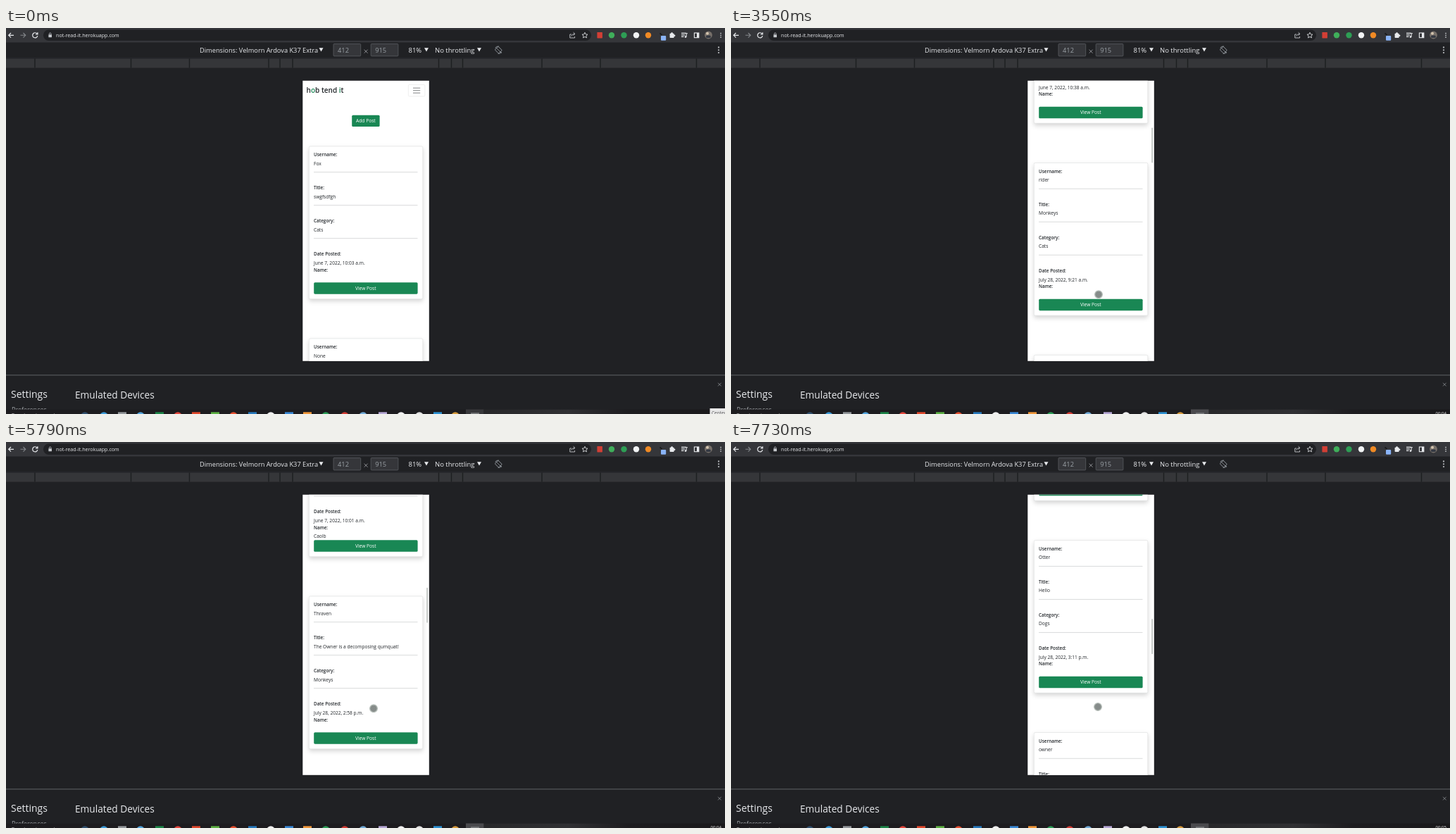
An HTML page for the animation above (8 s loop, 1021 by 548 pixels).

```html
<!DOCTYPE html>
<html lang="en">
<head>
<meta charset="utf-8">
<title>Mobile feed preview</title>
<style>
  html, body { margin: 0; width: 100%; height: 100%; overflow: hidden; background: #202124; }
  svg { display: block; width: 1021px; height: 548px; font-family: "Open Sans", "Noto Sans", sans-serif; }
  text { white-space: pre; }
  .card { fill: #fff; stroke: #dcdddd; stroke-width: .6; filter: drop-shadow(0 3.2px 3.2px rgba(0, 0, 0, .17)); }
</style>
</head>
<body>
<svg id="stage" viewBox="0 0 1021 548"></svg>
<script>
const LOOP = 8000;
const NOTCH = 43.53;      // pixels per wheel notch
const CARD_STEP = 272.9;
const GREEN = '#198754';
const INK = '#212529';
const LIGHT = '#e8eaed';

const rect = (x, y, w, h, fill, extra = '') =>
  `<rect x="${x}" y="${y}" width="${w}" height="${h}" fill="${fill}" ${extra}/>`;
const circle = (x, y, r, fill, extra = '') =>
  `<circle cx="${x}" cy="${y}" r="${r}" fill="${fill}" ${extra}/>`;
const line = (d, stroke, width = 1, extra = '') =>
  `<path d="${d}" fill="none" stroke="${stroke}" stroke-width="${width}" ${extra}/>`;
const text = (x, y, size, fill, str, extra = '') =>
  `<text x="${x}" y="${y}" font-size="${size}" fill="${fill}" ${extra}>${str}</text>`;
const triangle = x => `<path d="M${x - 3} 28.2h6l-3 5.4z" fill="${LIGHT}"/>`;
const dots = (x, y, gap, r, fill) => [-gap, 0, gap].map(d => circle(x, y + d, r, fill)).join('');

function browserBar() {
  const badges = [
    [860, '#3fae5a'], [877.5, '#2e9e55'], [895, '#f1f3f4'], [912, '#f08a24']
  ];
  return rect(0, 0, 1021, 20.5, '#35363a')
    + rect(53, 2.5, 778, 15.5, '#202124', 'rx="7.7"')
    + line('M11 10.3H4M7 7L3.7 10.3L7 13.6', LIGHT, 1.2)
    + line('M20.5 10.3H27.5M24.5 7L27.8 10.3L24.5 13.6', '#85888c', 1.1)
    + line('M44.2 8.2A3.6 3.6 0 1 0 44.8 11.2M44.9 6.2V9H42', LIGHT, 1.2)
    + rect(60.4, 9.3, 4.6, 3.9, '#c4c7cb', 'rx=".5"')
    + line('M61.4 9.4V8.2a1.3 1.3 0 0 1 2.6 0V9.4', '#c4c7cb', .8)
    + text(71, 12.9, 7.15, LIGHT, 'not-read-it.herokuapp.com')
    + line('M803 9H800.8V14H807.6V12M802.8 11.5Q803.4 8.6 807.6 8.4M805.6 6.2L808 8.4L805.6 10.6', '#c4c7cb', .9)
    + line('M822 6.3l1.2 2.6 2.8.3-2.1 1.9.6 2.8-2.5-1.4-2.5 1.4.6-2.8-2.1-1.9 2.8-.3z', '#d5d7da', .9)
    + rect(839.4, 6, 7.5, 8.4, '#d23f35', 'rx=".6"')
    + badges.map(([x, c]) => circle(x, 10.3, 4.2, c)).join('')
    + rect(930, 11, 7.2, 6.8, '#8ab4f8', 'rx="1"')
    + line('M928.5 7.5l3 2.3', '#18191b', 1.6)
    + rect(942.6, 7.8, 6, 6.2, LIGHT, 'rx=".7"') + circle(945.6, 7.6, 1.4, LIGHT) + circle(949, 10.8, 1.4, LIGHT)
    + line('M959 7.4H966M959 9.9H964M959 12.4H962.5M966 12.5V7.7H968', LIGHT, 1.1)
    + circle(965, 12.6, 1.3, LIGHT)
    + rect(977.4, 7, 6.4, 6.7, 'none', `stroke="${LIGHT}" stroke-width="1.1"`) + rect(981, 7, 3, 6.7, LIGHT)
    + circle(997.5, 10, 5.4, '#77706a') + circle(996, 7.8, 2, '#d3c4af') + rect(994, 10.4, 6.8, 3.6, '#343943', 'rx="1.5"')
    + dots(1015, 10.3, 2.8, .8, LIGHT);
}

function deviceBar() {
  const field = (x, value) =>
    rect(x, 22.5, 38.7, 17.4, '#35363a', 'rx="1" stroke="#5b5e62" stroke-width=".8"')
    + text(x + 6, 34.9, 9.3, '#9aa0a6', value);
  const breaks = [41, 177.5, 260.5, 373, 389, 407, 614.5, 632.5, 648.5, 761, 844, 980.5];
  return text(275, 34.8, 9.25, LIGHT, 'Dimensions: Velmorn Ardova K37 Extra')
    + triangle(447.5) + field(465, '412') + field(518.2, '915')
    + line('M508.6 30.7l5 5m0-5l-5 5', '#a5a8ac', .8)
    + text(571.5, 34.8, 9.5, LIGHT, '81%') + triangle(597)
    + text(609, 34.8, 9.5, LIGHT, 'No throttling') + triangle(672)
    + rect(696, 27.4, 6.6, 7.6, 'none', 'rx=".8" stroke="#9aa0a6" stroke-width=".9" transform="rotate(-45 699.3 31.2)"')
    + line('M694.6 28.5A5.3 5.3 0 0 1 700 26M704 34A5.3 5.3 0 0 1 698.6 36.4M695 27l8.6 8.6', '#9aa0a6', .8)
    + dots(1012, 31.3, 3.8, 1.15, '#aeb1b5')
    + rect(0, 42.2, 1021, 1.6, '#292a2d')
    + rect(0, 43.8, 1021, 12.8, '#353639')
    + breaks.map(x => rect(x - .7, 43.4, 1.4, 13.2, '#1d1e20')).join('');
}

function drawer() {
  const icons = [
    [112, '#31506e'], [139, '#3c9ad8'], [165, '#93979b', 1], [191, '#54a5dd'], [218, '#1c8548', 1],
    [244, '#e4473d'], [270, '#e0492d', 1], [297, '#5cb043', 1], [323, '#e65030'], [350, '#2779bd', 1],
    [376, '#eeeeee'], [402, '#3988d5', 1], [428, '#f0973a', 1], [454, '#2d9e58'], [481, '#d33d35'],
    [507, '#72abd8'], [535, '#b6a7d5', 1], [561, '#f1f1f1'], [587, '#e2e2e2'], [613, '#2d91d2', 1], [638, '#d69a3c']
  ];
  return rect(0, 492.2, 1021, 1.2, '#55575a')
    + line('M1011 503.8l4.6 4.6m0-4.6l-4.6 4.6', '#8f9296', .8)
    + text(7, 525, 14, LIGHT, 'Settings') + text(98, 525.8, 13.7, LIGHT, 'Emulated Devices')
    + text(8, 545, 9, '#a5a8ac', 'Preferences')
    + rect(0, 541.6, 1021, 7, '#1d1c1f') + rect(679, 541.6, 342, 7, 'url(#bar)')
    + text(8, 552, 7, '#b9b9bb', 'Type here to search now')
    + icons.map(([x, c, square]) => square ? rect(x - 6, 545.3, 12, 6, c) : circle(x, 551, 5.8, c)).join('')
    + rect(653, 541.4, 25.5, 7, '#4a4a4d', 'id="task"') + rect(660, 546.2, 12, 2, '#77797b')
    + text(1000.5, 549.2, 6, '#ededed', '00:04', 'id="clock"')
    + `<g id="tip">${rect(999.5, 540, 22, 9, '#e9e9e9')}${text(1002, 548.8, 6.5, '#555', 'Center')}</g>`;
}

function postCard(post, index) {
  const [user, title, category, date, name = ''] = post;
  const label = (y, str) => text(437, y, 6.35, INK, str, 'font-weight="600"');
  const value = (y, str) => text(437, y, 6.6, INK, str);
  const rows = [['Username:', user], ['Title:', title], ['Category:', category]].map(([key, val], i) => {
    const y = i * 47;
    return label(14.1 + y, key) + value(26.8 + y, val) + rect(437, 36.4 + y, 147.5, .7, '#c9cbcc');
  }).join('');
  return `<g transform="translate(0 ${168 + index * CARD_STEP})">`
    + rect(430.3, 0, 161.5, 216.7, '#fff', 'rx="1.8" class="card"') + rows
    + label(155.1, 'Date Posted:') + value(168.1, date) + label(177.7, 'Name:') + value(190, name)
    + rect(437.2, 193.2, 147.4, 16.5, GREEN, 'rx="1.6"')
    + text(510.8, 203.8, 6.65, '#fff', 'View Post', 'text-anchor="middle"') + '</g>';
}

function page() {
  const posts = [
    ['Fox', 'swgfsdfgh', 'Cats', 'June 7, 2022, 10:03 a.m.'],
    ['None', 'agaHHAS', 'Cats', 'June 7, 2022, 10:38 a.m.'],
    ['rider', 'Monkeys', 'Cats', 'July 28, 2022, 9:21 a.m.'],
    ['owner', 'sgtaga', 'Cats', 'June 7, 2022, 10:01 a.m.', 'Caolb'],
    ['Thraven', 'The Owner is a decomposing qumquat!', 'Monkeys', 'July 28, 2022, 2:58 p.m.'],
    ['Otter', 'Hello', 'Dogs', 'July 28, 2022, 3:11 p.m.'],
    ['owner', '', '', '']
  ];
  const tint = s => `<tspan fill="${GREEN}">${s}</tspan>`;
  return text(426.6, 91.5, 10, INK, `h${tint('o')}b tend ${tint('i')}t`, 'font-weight="600"')
    + rect(571.3, 80.4, 23.6, 16.6, '#fff', 'rx="1.6" stroke="#e4e5e5" stroke-width=".6"')
    + line('M578 85.2h10.2M578 88.7h10.2M578 92.2h10.2', '#737577', .9)
    + rect(491.2, 123.7, 39.4, 16.4, GREEN, 'rx="1.6"')
    + text(510.9, 134.3, 6.65, '#fff', 'Add Post', 'text-anchor="middle"')
    + posts.map(postCard).join('');
}

const stage = document.getElementById('stage');
stage.innerHTML = `<defs>
    <clipPath id="screen"><rect x="421.3" y="74.8" width="179.5" height="398"/></clipPath>
    <linearGradient id="bar"><stop stop-color="#28282a"/><stop offset=".35" stop-color="#303033"/>
      <stop offset=".6" stop-color="#1d1c1f"/><stop offset="1" stop-color="#1a191b"/></linearGradient>
  </defs>`
  + rect(0, 0, 1021, 548, '#202124') + browserBar() + deviceBar()
  + rect(421.3, 74.8, 179.5, 398, '#fff')
  + `<g clip-path="url(#screen)"><g id="page">${page()}</g>`
  + rect(597.2, 0, 1.8, 50, '#c2c6c4', 'id="thumb" rx=".9"')
  + circle(0, 0, 5.3, '#7f8583', 'id="touch" fill-opacity=".94" stroke="#b5bdb8" stroke-width="1.3"') + '</g>'
  + drawer();

const [pageEl, thumb, touch, task, clock, tip] =
  ['page', 'thumb', 'touch', 'task', 'clock', 'tip'].map(id => document.getElementById(id));

// [time, wheel notches]
const scrollKeys = [
  [1660, 0], [2470, 5], [2540, 5], [2870, 9], [3210, 9], [3550, 12], [3690, 12], [3970, 14],
  [4230, 14], [4580, 17], [4650, 17], [4990, 19], [5120, 19], [5460, 22], [5590, 22], [5930, 25],
  [6440, 25], [6500, 25.35], [7110, 28], [7530, 28], [7730, 32]
];
// [time, x, y]
const touchKeys = [
  [210, 1015, 548], [910, 511.5, 382], [980, 511.5, 382], [1380, 519, 372], [1720, 519, 372],
  [2470, 525, 378.3], [3210, 525, 378.3], [3550, 522, 378.3], [7530, 522, 378.3], [7730, 521, 376]
];

function track(keys, t) {
  const next = keys.findIndex(key => key[0] > t);
  if (next === 0) return keys[0].slice(1);
  if (next < 0) return keys[keys.length - 1].slice(1);
  const from = keys[next - 1], to = keys[next];
  const u = (t - from[0]) / (to[0] - from[0]);
  const eased = u * u * (3 - 2 * u);
  return from.slice(1).map((v, i) => v + (to[i + 1] - v) * eased);
}

function render(t) {
  const [notches] = track(scrollKeys, t);
  const [x, y] = track(touchKeys, t);
  pageEl.setAttribute('transform', `translate(0 ${-notches * NOTCH})`);
  thumb.setAttribute('y', 75.7 + notches * 5.48);
  thumb.setAttribute('opacity', notches > 0 ? 1 : 0);
  touch.setAttribute('cx', x);
  touch.setAttribute('cy', y);
  task.setAttribute('fill', t < 70 ? '#38383b' : '#4a4a4d');
  tip.setAttribute('opacity', t < 210 ? 1 : 0);
  clock.textContent = t < 6800 ? '00:04' : '00:05';
}

const start = performance.now();
function tick(now) {
  render(Math.max(0, now - start) % LOOP);
  requestAnimationFrame(tick);
}
render(0);
requestAnimationFrame(tick);
</script>
</body>
</html>
```
